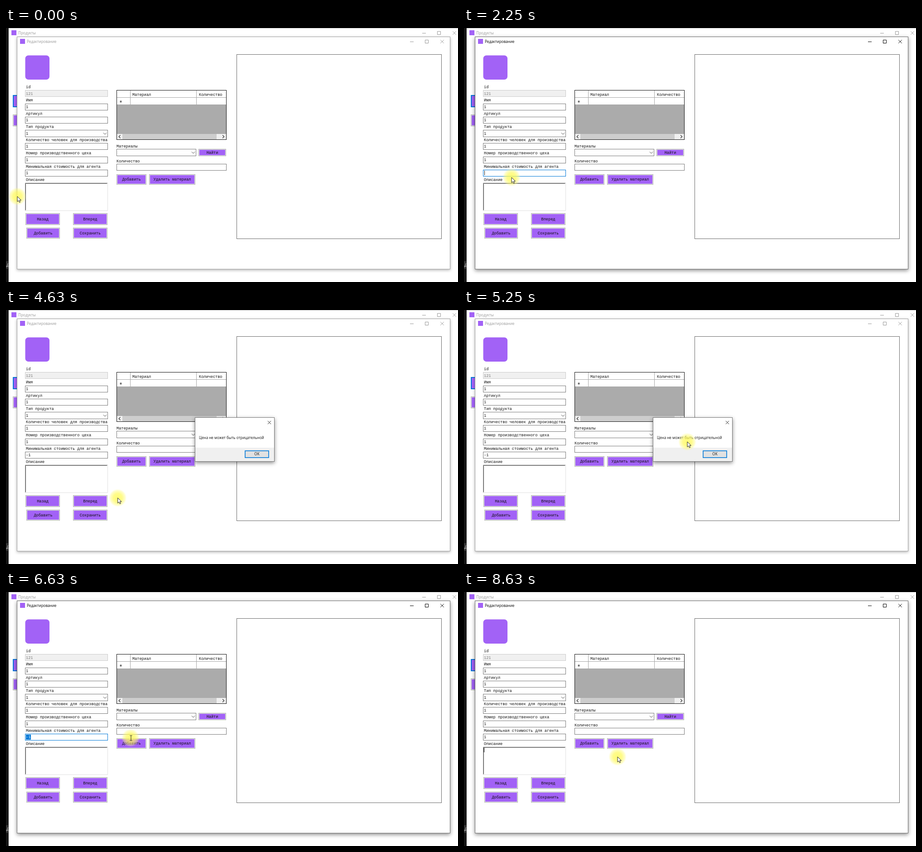
These frames come from a looping animation (998x561 px, 9250 ms). An HTML page:

```html
<!DOCTYPE html>
<html lang="ru">
<head>
<meta charset="utf-8">
<title>Редактирование</title>
<style>
html, body { margin: 0; width: 100%; height: 100%; overflow: hidden; background: #fff; }
svg { display: block; width: 998px; height: 561px; }
text { font: 8.58px "Liberation Mono", "Courier New", monospace; fill: #111; white-space: pre; }
.ui { font: 8.1px "Open Sans", "Noto Sans", sans-serif; }
.mid { text-anchor: middle; }
.gray { fill: #999; }
.dim { fill: #777; }
#frame { stroke: #a2a2a2; filter: drop-shadow(0 2px 3px rgba(0,0,0,.3)); }
#bar { color: #999; }
#bar text { fill: currentColor; }
.active #frame { stroke: #6e6e6e; filter: drop-shadow(0 3px 4.5px rgba(0,0,0,.45)); }
.active #bar { color: #000; }
#box { filter: drop-shadow(0 3px 4.5px rgba(0,0,0,.45)); }
</style>
</head>
<body>
<svg id="stage" viewBox="0 0 998 561">
  <defs>
    <radialGradient id="glow">
      <stop offset="0" stop-color="#fffa50" stop-opacity=".78"/>
      <stop offset=".5" stop-color="#fffa5a" stop-opacity=".7"/>
      <stop offset=".8" stop-color="#fffb78" stop-opacity=".42"/>
      <stop offset="1" stop-color="#fffca0" stop-opacity="0"/>
    </radialGradient>
  </defs>
  <g id="scene"></g>
  <g id="dialog"></g>
  <g id="mouse">
    <circle id="halo" r="20" fill="url(#glow)"/>
    <circle id="ring" r="17.5" fill="#fff264" fill-opacity=".68" stroke="#e0372c"/>
    <path id="arrow" d="M0 0V11.5L2.7 9L4.6 13.2L6.6 12.3L4.8 8.3H8.4Z" fill="#fff" stroke="#111" stroke-width=".9"/>
    <path id="beam" d="M-1.5 -5H.4L1 -4.5L1.6 -5H3.5M1 -4.5V5.5M-1.5 6H.4L1 5.5L1.6 6H3.5" fill="none" stroke="#222"/>
  </g>
</svg>
<script>
const $ = id => document.getElementById(id);
const LOOP = 9250, PURPLE = '#a262f6', BLUE = '#0078d7', PITCH = 5.15, ROW = 29.25;

// Static pieces
const fill = (x, y, w, h, c, extra = '') =>
  `<rect x="${x}" y="${y}" width="${w}" height="${h}" fill="${c}" ${extra}/>`;
const rect = (x, y, w, h, c, line, extra = '') =>
  fill(x + .5, y + .5, w - 1, h - 1, c, `stroke="${line}" ${extra}`);
const text = (x, cy, s, cls = '', extra = '') =>
  `<text x="${x}" y="${cy + 2.7}" class="${cls}" ${extra}>${s}</text>`;
const path = (d, c = '#444', extra = '') =>
  `<path d="${d}" fill="none" stroke="${c}" ${extra}/>`;
const input = (x, y, w, h = 15, extra = '') => rect(x, y, w, h, '#fff', '#7a7a7a', extra);
const combo = (x, y, w) => input(x, y, w, 16) + path(`M${x + w - 10} ${y + 6.5}l3.5 3.5l3.5 -3.5`);
const button = (x, y, w, h, s) =>
  rect(x, y, w, h, '#e8e8e8', '#adadad') + fill(x + 2, y + 2, w - 4, h - 4, PURPLE) +
  text(x + w / 2, y + h / 2, s, 'mid');
const cross = (x, y, r, c) =>
  path(`M${x - r} ${y - r}l${2 * r} ${2 * r}m0 ${-2 * r}l${-2 * r} ${2 * r}`, c, 'stroke-width=".9"');
const controls = (x, y, c) =>
  path(`M${x - 4} ${y + .5}h8M${x + 29.5} ${y - 3.5}h7v7h-7z`, c) + cross(x + 67, y, 3.8, c);

function backdrop() {
  return fill(0, 0, 998, 561, '#fff') + fill(0, 0, 6, 561, '#161616') +
    fill(0, 515, 6, 17, '#343434') + text(1, 524.5, 'Д', 'ui', 'style="fill:#ddd;font-style:italic"') +
    fill(5, 0, 1, 561, '#444') + fill(6, 0, 992, 1, '#bbb') +
    fill(12, 5, 11, 11, PURPLE) + text(27, 11.5, 'Продукты', 'ui gray') + controls(923, 11, '#999') +
    fill(15, 148, 20, 27, BLUE) + fill(17, 150, 18, 23, PURPLE) +
    rect(15, 191, 20, 26, '#e8e8e8', '#adadad') + fill(17, 193, 18, 22, PURPLE);
}

function leftForm() {
  const labels = ['id', 'Имя', 'Артикул', 'Тип продукта', 'Количество человек для производства',
    'Номер производственного цеха', 'Минимальная стоимость для агента', 'Описание'];
  let s = labels.map((l, i) => text(44, 130.5 + i * ROW, l)).join('');
  s += rect(42, 137, 183, 15, '#f0f0f0', '#ccc') + text(44, 145, '121', 'dim');
  for (const i of [1, 2, 4, 5]) {
    const y = Math.round(137.4 + i * ROW);
    s += input(42, y, 183) + text(44, y + 7.5, '1');
  }
  s += combo(42, 225, 183) + text(44, 233, '1');
  s += input(42, 313, 183, 15, 'id="price"') + fill(44, 315, 11, 11, BLUE, 'id="pick"') +
    text(44, 320.5, '', '', 'id="value"') + fill(0, 315, 1, 10, '#222', 'id="caret"');
  s += fill(42, 342, 183, 62, '#fff') + path('M224.5 342V403.5H42', '#e0e0e0') +
    path('M42.5 403V342.5H224', '#8a8a8a') + path('M43.5 402V343.5H223', '#696969') +
    fill(44, 344, 1, 10, '#222', 'id="note"');
  return s + button(43, 409, 76, 26, 'Назад') + button(148, 409, 76, 26, 'Вперед') +
    button(45, 441, 74, 24, 'Добавить') + button(148, 441, 76, 24, 'Сохранить');
}

function materials() {
  return rect(244, 137, 243, 110, '#ababab', '#111') + fill(245, 138, 241, 32, '#fff') +
    path('M245 153.5H486M245 169.5H486M274.5 138V170M420.5 138V170', '#a5a5a5') +
    text(279, 147, 'Материал') + text(426, 147, 'Количество') +
    path('M253.5 160v5M251.3 161.2l4.4 2.6M255.7 161.2l-4.4 2.6', '#333', 'stroke-width=".9"') +
    fill(245, 234, 241, 12, '#f0f0f0') + fill(257, 234, 208, 12, '#cdcdcd') +
    path('M252.5 236.8l-3.3 3.2l3.3 3.2M478.2 236.8l3.3 3.2l-3.3 3.2', '#333', 'stroke-width="1.3"') +
    text(244, 261, 'Материалы') + combo(244, 267, 176) + button(425, 267, 61, 16, 'Найти') +
    text(244, 294, 'Количество') + input(244, 300, 243) +
    button(244, 323, 66, 23, 'Добавить') + button(316, 323, 102, 23, 'Удалить материал');
}

function titleBar() {
  return `<g id="bar">${fill(31, 24, 11, 11, PURPLE)}` +
    `${text(46, 30.5, 'Редактирование', 'ui')}${controls(896, 30, 'currentColor')}</g>`;
}

$('scene').innerHTML = backdrop() + fill(24.5, 19.5, 956, 513, '#fff', 'id="frame"') + titleBar() +
  fill(42.5, 60.5, 53.5, 53.5, PURPLE, 'rx="7"') + leftForm() + materials() +
  rect(509, 58, 453, 408, '#fff', '#696969');

$('dialog').innerHTML = rect(417, 237, 176, 98, '#fff', '#777', 'id="box"') +
  fill(418, 304, 174, 30, '#f0f0f0') + cross(581.5, 248.5, 3.6, '#111') +
  text(426, 282.5, 'Цена не может быть отрицательной', 'ui') +
  fill(528, 311, 52, 15, '#e1e1e1', `stroke="${BLUE}" stroke-width="1.6"`) +
  text(554, 318.7, 'OK', 'ui mid');

// Pointer waypoints: time, x, y
const PATH = [
  [0, 25, 372], [750, 61, 318], [1250, 61, 318], [1380, 41, 319], [1630, 41, 320],
  [2250, 105, 330], [3250, 105, 330], [4000, 64, 355], [4250, 185, 446], [4380, 185, 446],
  [5250, 493, 291], [5630, 549, 318], [5750, 550, 318], [6630, 275, 322], [7000, 240, 326],
  [7380, 240, 326], [8000, 110, 372], [8630, 339, 364]
];
// The picture refreshes at uneven ticks within each second
const TICKS = [750, 630, 380, 250, 0];

function snap(t) {
  const r = t % 1000;
  return t - r + TICKS.find(k => k <= r);
}

function pointer(t) {
  const i = PATH.findIndex(p => p[0] > t);
  if (i < 0) return PATH[PATH.length - 1].slice(1);
  const [t0, x0, y0] = PATH[i - 1], [t1, x1, y1] = PATH[i];
  const u = (t - t0) / (t1 - t0), e = u * u * (3 - 2 * u);
  return [x0 + (x1 - x0) * e, y0 + (y1 - y0) * e];
}

const show = (id, on) => $(id).setAttribute('visibility', on ? 'visible' : 'hidden');

function draw(time) {
  const t = snap(time);
  const within = (...spans) => spans.some(([a, b]) => t >= a && t < b);
  const value = t < 1750 ? '1' : t < 2630 ? '' : t < 3000 ? '-' : t < 7250 ? '-1' : '1';
  const picked = within([1380, 1750], [6000, 7250]);
  const focused = within([1000, 4250], [6000, 8000]);
  const hidden = within([2630, 3380], [7250, 7630]);
  const beam = within([750, 1750], [3630, 4250], [6630, 7000], [7750, 8250]);
  const pressed = within([1000, 1250], [1380, 1630], [4250, 4380], [5750, 6000], [8000, 8250]);

  $('stage').classList.toggle('active', within([1000, 4380], [6000, LOOP]));
  $('dialog').style.display = within([4380, 6000]) ? '' : 'none';

  $('price').setAttribute('stroke', !focused ? '#7a7a7a' : t < 1250 ? '#1f4f7a' : BLUE);
  $('value').textContent = value;
  $('value').style.fill = picked ? '#fff' : '';
  $('pick').setAttribute('width', PITCH * value.length + .7);
  show('pick', picked);
  $('caret').setAttribute('x', Math.round(44.5 + PITCH * value.length));
  show('caret', within([1000, 1250], [1750, 3380], [7250, 7750]));
  show('note', t >= 8000);

  const [x, y] = pointer(t);
  $('mouse').setAttribute('transform', `translate(${x.toFixed(1)} ${y.toFixed(1)})`);
  show('halo', !pressed);
  show('ring', pressed);
  show('arrow', !hidden && !beam);
  show('beam', !hidden && beam);
}

const start = performance.now();
function loop() {
  draw((performance.now() - start) % LOOP);
  requestAnimationFrame(loop);
}
loop();
</script>
</body>
</html>
```
